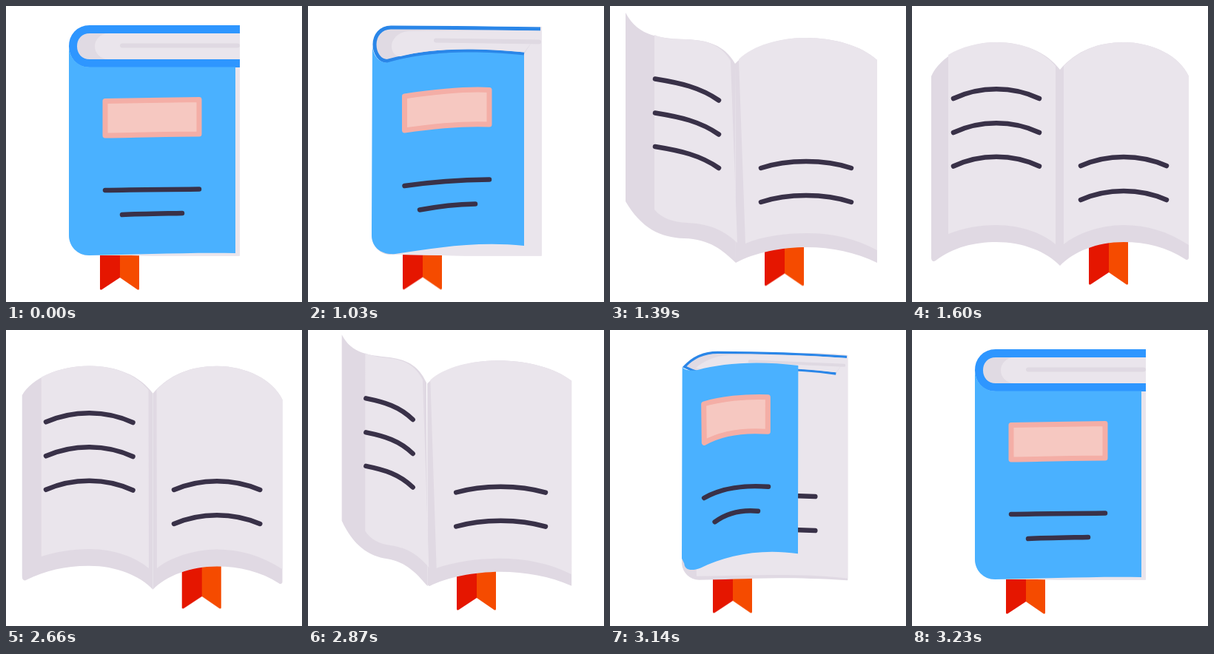
Recreate the animation shown at these times as an HTML page without scripts. Size 400 by 400 pixels, loop 3260 ms.

```html
<!DOCTYPE html>
<html lang="en">
<head>
<meta charset="utf-8">
<title>Opening book</title>
<style>
html, body { margin: 0; width: 100%; height: 100%; overflow: hidden; background: #fff; }
svg { display: block; width: 100vw; height: 100vh; }

/* Opens in one pass and closes in the alternate pass; poses advance every 30 ms. */
svg * { animation: 1630ms linear -2762ms infinite alternate; }

.edge { fill: #e0d9e3; }
.page { fill: #eae5ec; }
.ink { fill: none; stroke: #393148; stroke-width: 6.5; stroke-linecap: round; }
.cover { fill: #4ab1ff; }
.label { fill: #f6c8c1; stroke: #f4aea6; stroke-width: 7; stroke-linejoin: round; }
.spine { fill: #e0dae3; stroke: #2e96ff; stroke-width: 11; }
.seam { fill: none; stroke: #dfd9e2; stroke-width: 6; stroke-linecap: round; }

.ribbon { animation-name: ribbon; }
.right.edge { animation-name: right-edge; }
.right.page { animation-name: right-page; }
.right.ink { animation-name: right-ink; }
.left.edge { animation-name: left-edge; }
.left.page { animation-name: left-page; }
.left.ink { animation-name: left-ink; }
.cover { animation-name: cover; }
.label { animation-name: label; }
.title { animation-name: title; }
.author { animation-name: author; }
.spine { animation-name: spine; }
.block { animation-name: block; }
.seam { animation-name: seam; }
.outside { animation-name: hide; animation-timing-function: step-end; }
.inside { animation-name: show; animation-timing-function: step-end; }

@keyframes hide { 0% { opacity: 1 } 47.239%, 100% { opacity: 0 } }
@keyframes show { 0% { opacity: 0 } 47.239%, 100% { opacity: 1 } }

@keyframes ribbon {
  0%, 30.675% { transform: translate(0, 0); animation-timing-function: steps(1) }
  32.515% { transform: translate(1px, -.5px); animation-timing-function: steps(6) }
  43.558% { transform: translate(34px, -2.5px); animation-timing-function: steps(6) }
  54.601% { transform: translate(82px, -5.5px); animation-timing-function: steps(3) }
  60.123% { transform: translate(107px, -7px); animation-timing-function: steps(4) }
  67.485%, 100% { transform: translate(112px, -7px) }
}
@keyframes right-edge {
  0%, 30.675% { d: path("M100 60C140 38 200 38 240 38C270 38 300 38 316 38L316 336C316 337 316 337.5 314 337.5C280 337.5 250 337.5 228 337.5C185 337.5 150 337 112 337C98 337 86 326 85 310Z"); animation-timing-function: steps(1) }
  32.515% { d: path("M100 60C140 40 200 36 240 32C270 29 300 28 316 28L316 336C316 337 316 337.5 314 337.5C280 337.5 250 337.5 228 337.5C185 337.5 150 336 112 336C98 336 87 326 86 310Z"); animation-timing-function: steps(6) }
  43.558% { d: path("M122 45C140 36 180 33 212 33C260 33 300 38 332 47L332 340C332 340 332 340 332 340C300 333 265 331 228 331C185 332 150 341 137 341C128 340 121 334 119 327Z"); animation-timing-function: steps(6) }
  54.601% { d: path("M169 78C190 56 225 43 265 43C304 43 340 54 361 73L361 347C361 347 361 347 361 347C332 333 300 326 266 326C232 326 196 333 170 347C170 347 170 347 170 347Z"); animation-timing-function: steps(3) }
  60.123% { d: path("M194 85C216 59 247 48 282 48C322 48 358 66 372 91L372 341C372 343 370 344 368 343C344 328 312 321 282 321C246 321 212 333 194 350C194 350 194 350 194 350Z"); animation-timing-function: steps(4) }
  67.485%, 100% { d: path("M200 86C222 60 252 49 286 49C326 49 362 68 374 95L374 340C374 343 371 344 369 342C345 326 316 319 286 319C250 319 218 332 200 351C200 351 200 351 200 351Z") }
}
@keyframes right-page {
  0%, 30.675% { d: path("M100 60C140 38 200 38 240 38C270 38 300 38 316 38L316 337.5C290 337.5 260 337.5 228 337.5C185 337.5 150 337 112 337Z"); animation-timing-function: steps(1) }
  32.515% { d: path("M100 60C140 40 200 36 240 32C270 29 300 28 316 28L316 337.5C290 337.5 260 337.5 228 337.5C185 337.5 150 336 112 336Z"); animation-timing-function: steps(6) }
  43.558% { d: path("M122 45C140 36 180 33 212 33C260 33 300 38 332 47L332 332C300 322 264 318 228 318C190 318 155 325 127 326Z"); animation-timing-function: steps(6) }
  54.601% { d: path("M174 72C194 53 228 43 265 43C304 43 340 54 361 73L361 330C332 314 300 307 266 307C238 307 206 311 183 321Z"); animation-timing-function: steps(3) }
  60.123% { d: path("M199 80C221 58 247 48 282 48C322 48 358 66 372 91L372 324C344 306 312 298 282 298C250 298 216 309 201 322Z"); animation-timing-function: steps(4) }
  67.485%, 100% { d: path("M205 81C226 60 252 49 286 49C326 49 362 68 374 95L374 323C345 304 316 296 286 296C254 296 222 308 205 322Z") }
}
@keyframes right-ink {
  0%, 32.515% { d: path("M154 226C190 226 235 226 268 226"); animation-timing-function: steps(6) }
  43.558% { d: path("M181 222C215 219 262 219 296 223"); animation-timing-function: steps(6) }
  54.601% { d: path("M204 219C240 207 290 207 326 219"); animation-timing-function: steps(3) }
  60.123% { d: path("M224 216C260 201 304 201 341 216"); animation-timing-function: steps(4) }
  67.485%, 100% { d: path("M228 216C264 200 308 200 344 216") }
}
@keyframes left-edge {
  0%, 43.558% { d: path("M120 40C121 20 135 8 150 8C160 8 170 9 178 11L178 259C178 259 178 259 178 259C160 252 140 250 132 285C130 305 129 320 122 336Z"); animation-timing-function: steps(3) }
  49.08% { d: path("M142 58C138 35 130 25 118 20C108 15 100 12 95 1L95 245C95 245 95 245 95 245C100 275 110 290 122 300C132 312 138 330 145 345Z"); animation-timing-function: steps(3) }
  54.601% { d: path("M169 78C155 52 130 46 103 45C70 44 38 42 21 9L21 264C21 264 21 264 21 264C42 300 68 313 100 314C135 315 152 330 170 347Z"); animation-timing-function: steps(3) }
  60.123% { d: path("M194 85C178 60 148 48 112 47C64 46 24 58 9 68L9 312C9 318 12 320 16 318C44 322 74 317 108 318C146 318 178 332 194 350Z"); animation-timing-function: steps(4) }
  67.485%, 100% { d: path("M200 86C182 62 150 49 114 49C74 49 38 68 26 95L26 340C26 345 29 346 32 344C56 326 84 319 114 319C150 319 182 332 200 351Z") }
}
@keyframes left-page {
  0%, 43.558% { d: path("M122 40C123 20 135 8 150 8C158 8 164 9 170 10L170 256C165 254 158 252 152 255C140 260 130 290 124 322Z"); animation-timing-function: steps(3) }
  49.08% { d: path("M139 54C135 38 130 30 124 24C120 21 116 18 112 16L112 265C114 275 118 282 124 287C132 295 138 305 146 322Z"); animation-timing-function: steps(3) }
  54.601% { d: path("M163 74C150 52 130 46 103 45C85 45 72 44 60 39L60 275C70 287 85 292 105 293C140 295 155 305 172 320Z"); animation-timing-function: steps(3) }
  60.123% { d: path("M188 81C172 60 146 48 112 47C88 47 62 50 44 57L44 300C64 299 86 296 110 296C144 296 172 308 190 322Z"); animation-timing-function: steps(4) }
  67.485%, 100% { d: path("M194 81C176 60 148 49 114 49C90 49 67 55 49 66L49 308C70 300 90 296 114 296C148 296 178 308 194 322Z") }
}
@keyframes left-ink {
  0%, 43.558% { d: path("M128 60C140 50 150 50 160 55"); animation-timing-function: steps(3) }
  49.08% { d: path("M113 80C120 84 127 90 131 108"); animation-timing-function: steps(3) }
  54.601% { d: path("M61 98.5C95 104 122 110 147 127.5"); animation-timing-function: steps(3) }
  60.123% { d: path("M48 122C86 108 134 108 170 125"); animation-timing-function: steps(4) }
  67.485%, 100% { d: path("M56 125C92 108 136 108 172 125") }
}
@keyframes cover {
  0%, 30.675% { d: path("M85 54C85 70 97 82.5 112 82.5C180 82.5 250 82.5 310 82.5L310 334C240 333 180 336 112 337C97 337 85 325 85 310L85 300Z"); animation-timing-function: steps(1) }
  32.515% { d: path("M87 54C88 68 97 77 107 76.5C150 64 210 58 292 66.5L292 324C230 317 170 327 118 335C100 337 86 326 86 310L86 300Z"); animation-timing-function: steps(6) }
  43.558% { d: path("M119 40C118 25 128 13 142 9C155 7 170 8 179 11L178 259C155 250 131 258 130 295C129 305 130 320 129 327L119 326Z"); animation-timing-function: steps(3) }
  49.08%, 100% { d: path("M142 58C138 35 130 25 118 20C108 15 100 12 95 1L95 245C100 275 110 290 122 300C132 312 138 330 145 345L145 340Z") }
}
@keyframes label {
  0%, 30.675% { d: path("M134 128.5C170 128 220 127 261 126.5L261 173C220 173 170 174.5 134 175Z"); animation-timing-function: steps(1) }
  32.515% { d: path("M130.5 122C165 117 210 111.5 245 113.5L245 160C210 158.5 165 163 130.5 168Z"); animation-timing-function: steps(6) }
  43.558% { d: path("M119 56C118 46 126 45 150 45L150 92C126 88 122 92 121 121Z"); stroke-width: 7; animation-timing-function: steps(3) }
  49.08%, 100% { d: path("M132 60C125 50 118 45 110 40L110 90C118 95 125 102 132 110Z"); stroke-width: 0 }
}
@keyframes title {
  0%, 30.675% { d: path("M134 249C170 248 220 248 261 247.5"); animation-timing-function: steps(1) }
  32.515% { d: path("M130.5 243C165 238 205 235 245 234.5"); animation-timing-function: steps(6) }
  43.558% { d: path("M120.5 195C122 165 138 158 152 166.5"); stroke-width: 6.5; animation-timing-function: steps(3) }
  49.08%, 100% { d: path("M132 190C125 180 118 172 110 168"); stroke-width: 0 }
}
@keyframes author {
  0%, 30.675% { d: path("M157 282C180 281 215 280.5 238 280"); animation-timing-function: steps(1) }
  32.515% { d: path("M151 275.5C175 271 200 268 226 267.5"); animation-timing-function: steps(6) }
  43.558% { d: path("M123 227C126 198 138 192 148 199"); stroke-width: 6.5; animation-timing-function: steps(3) }
  49.08%, 100% { d: path("M132 225C126 215 120 208 115 205"); stroke-width: 0 }
}
@keyframes spine {
  0%, 30.675% { d: path("M316 31.5C250 31.5 180 31.5 113 31.5C99 31.5 90.5 42 90.5 54.5C90.5 67 99 77.5 113 77.5C180 77.5 250 77.5 316 77.5"); stroke: #2e96ff; stroke-width: 11; animation-timing-function: steps(1) }
  32.515% { d: path("M314 31C250 30 180 29 112 29C98 29 90 40 90 52C90 64 97 74.5 107 74.5C150 62 210 56 292 65"); stroke: #2a86e8; stroke-width: 5; animation-timing-function: steps(6) }
  43.558%, 100% { d: path("M332 47C292 37 252 33 212 33C182 33 152 36 122 45C152 36 182 33 212 33C252 33 292 37 332 47"); stroke: #2a86e8; stroke-width: 0 }
}
@keyframes block {
  0%, 30.675% { d: path("M316 37C250 37 190 37 138 37C128 37 120 45 120 54.5C120 64 128 72 138 72C190 72 250 72 316 72Z"); animation-timing-function: steps(1) }
  32.515% { d: path("M314 33.5C250 32.5 200 33 135 34C120 36 113 46 113 54C113 62 117 68 125 68C160 59 210 55 292 62.5Z"); animation-timing-function: steps(6) }
  43.558%, 100% { d: path("M332 47C292 37 252 33 212 33C182 33 152 36 122 45C152 36 182 33 212 33C252 33 292 37 332 47Z") }
}
@keyframes seam {
  0%, 30.675% { d: path("M157 53.5L313 53.5"); stroke-width: 6; animation-timing-function: steps(1) }
  32.515% { d: path("M173 46.5L312 48.5"); stroke-width: 6; animation-timing-function: steps(6) }
  43.558%, 100% { d: path("M220 34L325 46"); stroke-width: 0 }
}
</style>
</head>
<body>
<svg viewBox="0 0 400 400">
  <g class="ribbon">
    <path fill="#e51600" d="M127 322H154V367L129 383.5Q127 384 127 382Z"/>
    <path fill="#f54b00" d="M154 322H180V382Q180 384 178 383.5L154 367Z"/>
  </g>

  <path class="right edge"/>
  <path class="right page"/>
  <path class="right ink"/>
  <path class="right ink" transform="translate(0 46)"/>

  <g class="outside">
    <path class="spine"/>
    <path class="block" fill="#eae5ec"/>
    <path class="seam"/>
    <path class="cover"/>
    <path class="label"/>
    <path class="ink title"/>
    <path class="ink author"/>
  </g>

  <g class="inside">
    <path class="left edge"/>
    <path class="left page"/>
    <path class="left ink"/>
    <path class="left ink" transform="translate(0 46)"/>
    <path class="left ink" transform="translate(0 91.5)"/>
  </g>
</svg>
</body>
</html>
```
